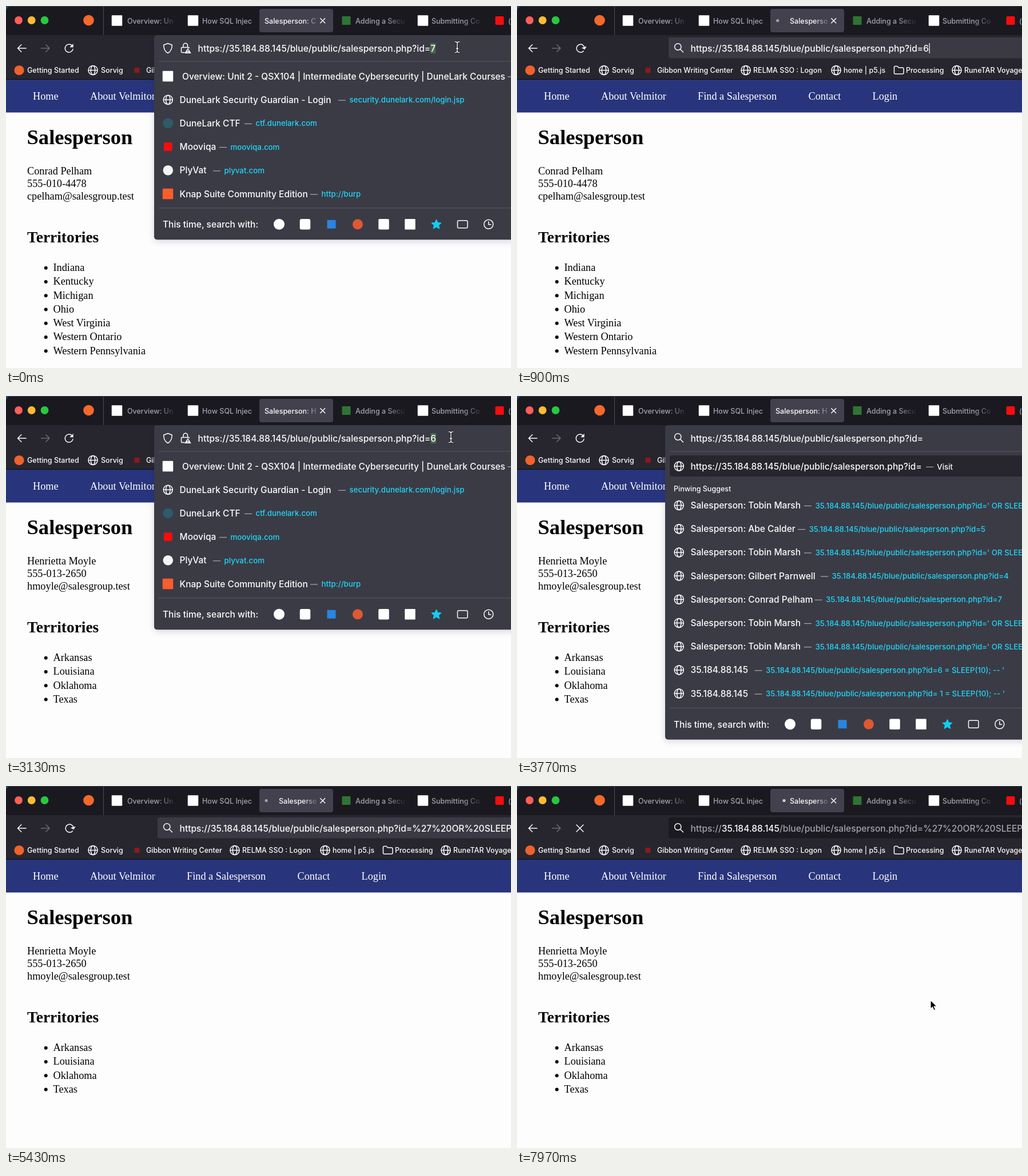
An HTML page for the animation above (8 s loop, 883 px wide and 634 px high).

```html
<!DOCTYPE html>
<html lang="en">
<head>
<meta charset="utf-8">
<title>Browser session</title>
<style>
html, body { margin: 0; width: 100%; height: 100%; overflow: hidden; background: #fdfdfd; }
svg { display: block; width: 883px; height: 634px; }
.ui { font: 500 15.5px Inter, "Open Sans", sans-serif; fill: #fbfbfe; }
#url { font-size: 15.6px; }
.small { font-size: 13.3px; }
.tab { font-size: 12.5px; }
.mark { font-size: 12.5px; }
.link { font-size: 13.3px; fill: #1fd6f8; }
.dim { fill: #a3a2ab; }
.page { font: 18.3px "Liberation Serif", Times, serif; fill: #000; }
.nav { fill: #fff; }
.h1 { font-size: 36.6px; font-weight: 700; }
.h2 { font-size: 27.4px; font-weight: 700; }
.line { fill: none; stroke: #fbfbfe; stroke-width: 1.5; stroke-linecap: round; stroke-linejoin: round; }
</style>
</head>
<body>
<svg id="stage" viewBox="0 0 883 634" xmlns="http://www.w3.org/2000/svg"></svg>
<script>
const LOOP = 8000;
const STRIP = '#1a1920', BAR = '#27262e', FIELD = '#1b1a21', RAISED = '#3b3a44', TAB = '#42414d';
const HOST = '35.184.88.145', PATH = '/blue/public/salesperson.php?id=';
const PAYLOAD = '%27%20OR%20SLEEP(10)=0--%27';

// Moments of the session in ms
const CLEAR1 = 350, TYPE = 600, ENTER1 = 830, LOADED = 1300,
      FOCUS = 2650, CLEAR2 = 3400, PASTE = 4100, ENTER2 = 5400;

const text = (x, y, cls, s, extra = '') => `<text x="${x}" y="${y}" class="${cls}" ${extra}>${s}</text>`;
const ui = (x, y, s, cls = '') => text(x, y, 'ui ' + cls, s);
const rect = (x, y, w, h, fill, r = 0, extra = '') =>
  `<rect x="${x}" y="${y}" width="${w}" height="${h}" fill="${fill}" rx="${r}" ${extra}/>`;
const dot = (x, y, r, fill, extra = '') => `<circle cx="${x}" cy="${y}" r="${r}" fill="${fill}" ${extra}/>`;
const line = (d, extra = '') => `<path class="line" d="${d}" ${extra}/>`;
const group = (id, body) => `<g id="${id}">${body}</g>`;
const square = (x, y, size, fill, r = 1) => rect(x - size / 2, y - size / 2, size, size, fill, r);
const ring = (x, y, r) => `<circle class="line" cx="${x}" cy="${y}" r="${r}"/>`;
const globe = (x, y) => ring(x, y, 8) +
  `<ellipse class="line" cx="${x}" cy="${y}" rx="3.7" ry="8"/>` + line(`M${x - 8} ${y}h16`);

function star(x, y, r) {
  const pts = Array.from({ length: 10 }, (_, i) => {
    const a = i * Math.PI / 5 - Math.PI / 2, k = i % 2 ? r * 0.48 : r;
    return `${(x + k * Math.cos(a)).toFixed(1)},${(y + k * Math.sin(a)).toFixed(1)}`;
  });
  return `<polygon points="${pts.join(' ')}" fill="#12cdf3" stroke="#12cdf3" stroke-linejoin="round"/>`;
}

const fade = (x, w, grad) => rect(x, 14, w, 26, `url(#${grad})`);
const gradient = (id, color) => `<linearGradient id="${id}"><stop offset="0" stop-color="${color}" stop-opacity="0"/>` +
  `<stop offset="1" stop-color="${color}"/></linearGradient>`;

function tabStrip() {
  return rect(0, 0, 883, 51, STRIP) + rect(0, 0, 883, 1, '#45444c') +
    '<path d="M0 0h9Q1 1 0 9z" fill="#234a6a"/>' +
    dot(22, 25, 6.9, '#ff5f57') + dot(44.7, 25, 6.9, '#febc2e') + dot(67.5, 25, 6.9, '#28c840') +
    dot(144.5, 25, 9.3, '#f5692b') + rect(170, 1, 1, 50, '#4c4b54') +
    square(194, 25.5, 18.5, '#fff') + ui(212, 31, 'Overview: Un', 'tab dim') + fade(268, 30, 'fadeStrip') +
    square(327, 25.5, 18.5, '#fff') + ui(343, 31, 'How SQL Injec', 'tab dim') +
    rect(443, 5, 129, 41, TAB, 4) +
    text(452, 31, 'ui tab', '', 'id="title"') + fade(520, 28, 'fadeTab') +
    line('M549.7 21.7l8 8m0-8l-8 8') + dot(0, 25.5, 2.6, '#d0cfd8', 'id="throb"') +
    square(595, 25.5, 15, '#2f7434') + ui(611, 31, 'Adding a Secu', 'tab dim') + fade(666, 34, 'fadeStrip') +
    square(729, 25.5, 18.5, '#fff') + ui(744, 31, 'Submitting Co', 'tab dim') + fade(800, 34, 'fadeStrip') +
    square(863, 25.5, 15, '#f60d0d', 2) + ui(878, 31, '(', 'tab dim');
}

function toolbar() {
  const marks = [[166, 'Sorvig', 152], [413, 'RELMA SSO : Logon', 400], [571, 'home | p5.js', 558], [782, 'RuneTAR Voyages', 769]];
  return rect(0, 51, 883, 78, BAR) +
    line('M35 74H20.5m6.3-6.3L20.5 74l6.3 6.3') +
    line('M61.5 74H76m-6.3-6.3L76 74l-6.3 6.3', 'style="stroke:#6b6a73"') +
    group('reload', line('M116 70.2A7 7 0 1 0 117 75.6') + '<path d="M117.6 66v6.3h-6.3z" fill="#fbfbfe"/>') +
    group('stop', line('M104 68l12 12m0-12l-12 12')) +
    dot(23, 112.5, 8.6, '#f0622c') + ui(37, 117, 'Getting Started', 'mark') +
    marks.map(([x, s, g]) => globe(g, 112.5) + ui(x, 117, s, 'mark')).join('') +
    square(229, 112.5, 9, '#8c1a20') + ui(245, 117, 'Gibbon Writing Center', 'mark') +
    line('M659.5 107.5q0-2 2-2h3.5l2.5 2.5h6.5q2 0 2 2v7q0 2-2 2h-12.5q-2 0-2-2z') +
    ui(680, 117, 'Processing', 'mark') + rect(0, 128, 883, 1, '#0d0d10');
}

function page() {
  const links = [[47, 'Home'], [147, 'About Velmitor'], [316, 'Find a Salesperson'], [509.5, 'Contact'], [621.5, 'Login']];
  return rect(0, 129, 883, 505, '#fdfdfd') + rect(0, 129, 883, 57.5, '#28357c') +
    links.map(([x, s]) => text(x, 164, 'page nav', s)).join('') +
    text(36.5, 242, 'page h1', 'Salesperson') + text(37, 413.5, 'page h2', 'Territories');
}

function person({ id, lines, places }) {
  return group(id, lines.map((s, i) => text(37, 295 + 22.2 * i, 'page', s)).join('') +
    places.map((s, i) => dot(69.7, 458.8 + 24.25 * i, 3, '#000') + text(82.5, 464.2 + 24.25 * i, 'page', s)).join(''));
}

const people = [
  { id: 'first', lines: ['Conrad Pelham', '555-010-4478', 'cpelham@salesgroup.test'],
    places: ['Indiana', 'Kentucky', 'Michigan', 'Ohio', 'West Virginia', 'Western Ontario', 'Western Pennsylvania'] },
  { id: 'second', lines: ['Henrietta Moyle', '555-013-2650', 'hmoyle@salesgroup.test'],
    places: ['Arkansas', 'Louisiana', 'Oklahoma', 'Texas'] }
];

// One suggestion: icon, title, dash and address
const dash = (x, y) => rect(x, y + 0.3, 13, 1.3, '#a3a2ab');
const row = (y, icon, title, dashX, url) => icon + ui(303.5, y + 5.5, title) +
  dash(dashX, y) + ui(dashX + 19.5, y + 5, url, 'link');

function footer(y) {
  return rect(267, y - 29, 616, 1, '#5a5963') + ui(274, y + 5.8, 'This time, search with:') +
    dot(477.5, y, 9.5, '#fff') + square(523, y, 18.5, '#fff', 3) + square(569, y, 15, '#2a84e0') +
    dot(615, y, 9, '#de5833') + square(660.5, y, 18.5, '#fff', 2) + square(706.5, y, 18.5, '#fff') +
    star(752.5, y + 0.5, 9) + `<rect class="line" x="789.5" y="${y - 6.5}" width="17.5" height="13" rx="2"/>` +
    ring(843.8, y, 8) + line(`M843.8 ${y - 4.5}v5h4`);
}

const panel = (id, footY, body) => group(id,
  rect(259, 51, 640, footY - 24, RAISED, 5, 'filter="url(#shade)"') +
  rect(267, 96.5, 616, 1, '#5a5963') + body + footer(footY));

function topSites() {
  const y = i => 123 + 41.2 * i;
  return panel('topSites', 382.3,
    square(283, y(0), 18.5, '#fff') + ui(308, y(0) + 5.5, 'Overview: Unit 2 - QSX104 | Intermediate Cybersecurity | DuneLark Courses') +
    dash(877, y(0)) +
    row(y(1), globe(283.3, y(1)), 'DuneLark Security Guardian - Login', 581, 'security.dunelark.com/login.jsp') +
    row(y(2), dot(283.3, y(2), 9, '#2f5a68'), 'DuneLark CTF', 417, 'ctf.dunelark.com') +
    row(y(3), square(283.3, y(3), 15, '#f60d0d', 2), 'Mooviqa', 373, 'mooviqa.com') +
    row(y(4), dot(283.3, y(4), 8.8, '#f4f4f6'), 'PlyVat', 362, 'plyvat.com') +
    row(y(5), square(283, y(5), 18.5, '#f95d2c'), 'Knap Suite Community Edition', 532, 'http://burp'));
}

const sleepRow = ['Salesperson: Tobin Marsh', 502, "' OR SLEEP(10)=0--'"];
const history = [
  sleepRow, ['Salesperson: Abe Calder', 491, '5'], sleepRow,
  ['Salesperson: Gilbert Parnwell', 531, '4'], ['Salesperson: Conrad Pelham', 520.5, '7'],
  sleepRow, sleepRow,
  [HOST, 415.5, "6 = SLEEP(10); -- '"], [HOST, 415.5, " 1 = SLEEP(10); -- '"]
];

function suggestions(id, rows) {
  const y = i => 191.5 + 41.2 * i;
  return panel(id, y(rows.length) + 12.5,
    rect(267, 104, 630, 37, BAR, 4) + globe(283.3, 123) + text(303.5, 128.5, 'ui', '', `id="${id}Visit"`) +
    ui(274, 167, 'Pinwing Suggest', 'tab') +
    rows.map(([title, x, q], i) => row(y(i), globe(283.3, y(i)), title, x, HOST + PATH + q)).join(''));
}

const shieldLock = group('secure',
  line('M283 65.5l7.3 2.8c0 7-2 11.5-7.3 14.2c-5.3-2.7-7.3-7.2-7.3-14.2z') +
  line('M310 72.5v-3.5a3.8 3.8 0 0 1 7.6 0v3.5M312 81.5h-4q-1.5 0-1.5-1.5v-6q0-1.5 1.5-1.5h11q1 0 1.5 1') +
  '<path d="M318 73.5l5.8 9.5h-11.6z" fill="#fbfbfe"/>' + rect(317.4, 76.5, 1.2, 3.2, BAR) + rect(317.4, 80.6, 1.2, 1.2, BAR));
const magnifier = group('lens', ring(281.3, 71.5, 5.7) + line('M285.5 75.7l5 5'));

const beam = 'M-4-9.5q4 0 4 3q0-3 4-3M0-6.5V6.5M-4 9.5q4 0 4-3q0 3 4 3M-2 2.5h4';
const pointers =
  group('ibeam', `<path d="${beam}" fill="none" stroke="#111" stroke-width="3.2"/><path d="${beam}" fill="none" stroke="#fff" stroke-width="1.4"/>`) +
  group('arrow', '<path d="M0 0v15.5l3.6-3.3l2.5 5.8l2.7-1.2l-2.5-5.6h4.9z" fill="#000" stroke="#fff" stroke-width="1.2"/>');

const stage = document.getElementById('stage');
stage.innerHTML = `<defs>${gradient('fadeStrip', STRIP)}${gradient('fadeTab', TAB)}` +
  '<filter id="shade" x="-10%" y="-10%" width="120%" height="120%">' +
  '<feDropShadow dx="0" dy="3" stdDeviation="6" flood-color="#201a50" flood-opacity=".16"/></filter></defs>' +
  page() + people.map(person).join('') + tabStrip() + toolbar() +
  rect(265, 55, 630, 36.5, FIELD, 4, 'id="field"') +
  topSites() + suggestions('fullList', history) + suggestions('shortList', Array(4).fill(sleepRow)) +
  shieldLock + magnifier + rect(0, 65, 9.5, 18, '#4a6a4c', 0, 'id="pick"') +
  text(0, 79.5, 'ui', '', 'id="url"') + rect(0, 65, 1.2, 18, '#fff', 0, 'id="caret"') + pointers;

const el = id => document.getElementById(id);
const show = (id, on) => el(id).setAttribute('display', on ? 'inline' : 'none');
const between = (t, a, b) => t >= a && t < b;
const ease = (t, a, b) => { const k = Math.min(1, Math.max(0, (t - a) / (b - a))); return k * k * (3 - 2 * k); };
const put = (node, html) => { if (node.shown !== html) node.innerHTML = node.shown = html; };

function drawPointer(t) {
  const down = ease(t, 5900, 6550);
  const lift = ease(t, 1750, 2050), drop = ease(t, 2250, 2550);
  const visible = t < CLEAR1 || between(t, 1750, CLEAR2) || t >= 5900;
  const x = 789 - 11 * lift - 55 * down;
  const y = 72 - 9 * lift + 9 * drop + 303 * down;
  const overField = y < 95;
  show('ibeam', visible && overField);
  show('arrow', visible && !overField);
  el(overField ? 'ibeam' : 'arrow').setAttribute('transform', `translate(${x} ${y})`);
}

function draw(t) {
  const open = t < CLEAR1 || between(t, FOCUS, CLEAR2);
  const editing = between(t, CLEAR1, ENTER1) || between(t, CLEAR2, ENTER2);
  const loading = between(t, ENTER1, LOADED) || t >= ENTER2;
  const since = t - (t >= ENTER2 ? ENTER2 : ENTER1);
  const focused = open || editing || (loading && since < 130);
  const query = t < CLEAR1 ? '7' : t < TYPE ? '' : t < CLEAR2 ? '6' : t < PASTE ? '' : PAYLOAD;
  const second = t >= LOADED;

  show('first', !second);
  show('second', second);
  show('topSites', open);
  show('fullList', editing && t < PASTE);
  show('shortList', editing && t >= PASTE);
  el('field').setAttribute('fill', focused ? RAISED : FIELD);

  const title = el('title');
  put(title, loading ? 'Salesperso' : second ? 'Salesperson: H' : 'Salesperson: C');
  title.setAttribute('x', loading ? 477 : 452);
  show('throb', loading);
  const swing = Math.cos(2 * Math.PI * since / 980);
  el('throb').setAttribute('cx', 462 - 7 * swing);
  el('throb').setAttribute('opacity', 0.85 - 0.2 * swing);

  const stopping = loading && since >= 300;
  show('reload', !stopping);
  show('stop', stopping);
  el('reload').setAttribute('transform', loading ? 'translate(1 0) rotate(30 110 74)' : '');

  const raw = !open && (editing || loading);
  show('lens', raw);
  show('secure', !raw);
  const url = el('url'), left = raw ? 303.5 : 335.5, full = 'https://' + HOST + PATH + query;
  url.setAttribute('x', left);
  put(url, focused ? full : `<tspan class="dim">https://</tspan>${HOST}<tspan class="dim">${PATH}${query}</tspan>`);
  const end = left + url.getComputedTextLength();
  show('pick', open);
  el('pick').setAttribute('x', end - 9.5);
  show('caret', focused && between(t, TYPE, LOADED));
  el('caret').setAttribute('x', end + 0.5);

  const visit = `${full} <tspan class="small dim" dx="3">—</tspan><tspan class="small" dx="6">Visit</tspan>`;
  put(el('fullListVisit'), visit);
  put(el('shortListVisit'), visit);
  drawPointer(t);
}

const begin = performance.now();
function tick() {
  draw((performance.now() - begin) % LOOP);
  requestAnimationFrame(tick);
}
tick();
</script>
</body>
</html>
```
